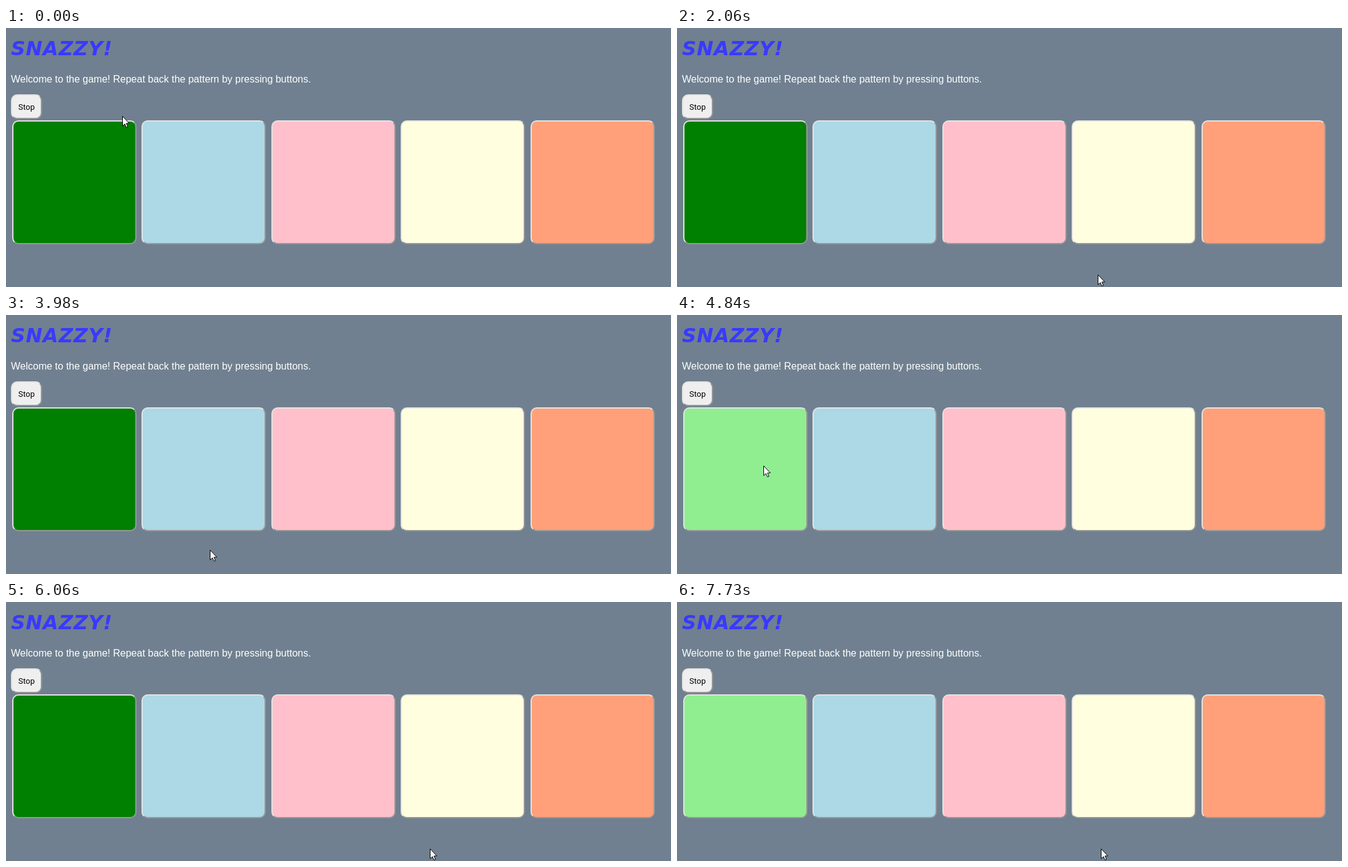
Write an HTML page that moves like this. It is 1070 px wide and 418 px high and loops after 8 s.

```html
<!DOCTYPE html>
<html lang="en">
<head>
<meta charset="utf-8">
<title>Pattern game</title>
<style>
  html, body { margin: 0; width: 100%; height: 100%; overflow: hidden; background: #708090; }
  h1, p, div, svg { position: absolute; margin: 0; white-space: nowrap; }
  h1 {
    left: 8px; top: 14px; color: #3939ff; letter-spacing: .7px;
    font: italic bold 32px/39px Verdana, "DejaVu Sans", sans-serif;
  }
  p { left: 8px; top: 74px; color: #fff; font: 16px/18px Arial, "Liberation Sans", sans-serif; }
  .btn {
    box-sizing: border-box; border: 2px solid; border-radius: 10px;
    border-color: #e3e3e3 #979797 #979797 #e3e3e3;
  }
  .btn.down { border-color: #979797 #e3e3e3 #e3e3e3 #979797; }
  #stop {
    left: 8px; top: 107px; width: 50px; height: 40px; background: #efefef; color: #000;
    font: 13px/38px Tahoma, Roboto, sans-serif; text-align: center;
  }
  .pad { top: 149px; width: 200px; height: 200px; }
  #cursor { left: 0; top: 0; width: 12px; height: 19px; overflow: visible; }
</style>
</head>
<body>
<h1>SNAZZY!</h1>
<p>Welcome to the game! Repeat back the pattern by pressing buttons.</p>
<div id="stop" class="btn">Stop</div>
<svg id="cursor" viewBox="0 0 12 19">
  <path d="M.5 .5V16.2L4.1 12.8L6.6 18.4L9 17.4L6.6 11.9H11.3Z" fill="#fff" stroke="#000"/>
</svg>
<script>
  const LOOP = 8000, STEP = 60;
  const cursor = document.getElementById('cursor');

  const colors = ['green', 'lightblue', 'pink', 'lightyellow', 'lightsalmon'];
  const pads = colors.map((color, i) => {
    const pad = document.createElement('div');
    pad.className = 'btn pad';
    pad.style.left = Math.round(10 + 208.45 * i) + 'px';
    pad.style.background = color;
    document.body.insertBefore(pad, cursor);
    return pad;
  });

  const span = (start, length) => t => t >= start && t < start + length;
  const clicks = [span(1010, 120), span(4530, STEP), span(4960, STEP)];
  const flashes = [
    span(0, 120),
    span(2060, 810), span(3180, 860),
    span(6060, 670), span(7070, 660)
  ];
  const any = (spans, t) => spans.some(active => active(t));

  const ease = u => u * u * (3 - 2 * u);

  // Each move starts where the one before it ended; bend bows the path sideways.
  const home = { x: 187, y: 142 };
  const moves = [
    { start: 60, steps: 3, x: 157, y: 187 },
    { start: 1330, steps: 11, x: 677, y: 398 },
    { start: 3800, steps: 8, x: 139, y: 243, bend: { x: -80, y: 58 } },
    { start: 5330, steps: 8, x: 682, y: 398 }
  ];

  function cursorAt(t) {
    let pos = home;
    for (const { start, steps, x, y, bend = { x: 0, y: 0 } } of moves) {
      if (t < start) break;
      const done = Math.floor((t - start) / STEP) + 1;
      const e = ease(Math.min(1, done / steps));
      const bow = 4 * e * (1 - e);
      pos = {
        x: pos.x + (x - pos.x) * e + bend.x * bow,
        y: pos.y + (y - pos.y) * e + bend.y * bow
      };
    }
    return pos;
  }

  function draw() {
    const t = performance.now() % LOOP;
    const { x, y } = cursorAt(t);
    const down = any(clicks, t);
    cursor.style.transform = `translate(${Math.round(x)}px, ${Math.round(y)}px)`;
    pads[0].style.background = down || any(flashes, t) ? 'green' : 'lightgreen';
    pads[0].classList.toggle('down', down);
    requestAnimationFrame(draw);
  }
  draw();
</script>
</body>
</html>
```
